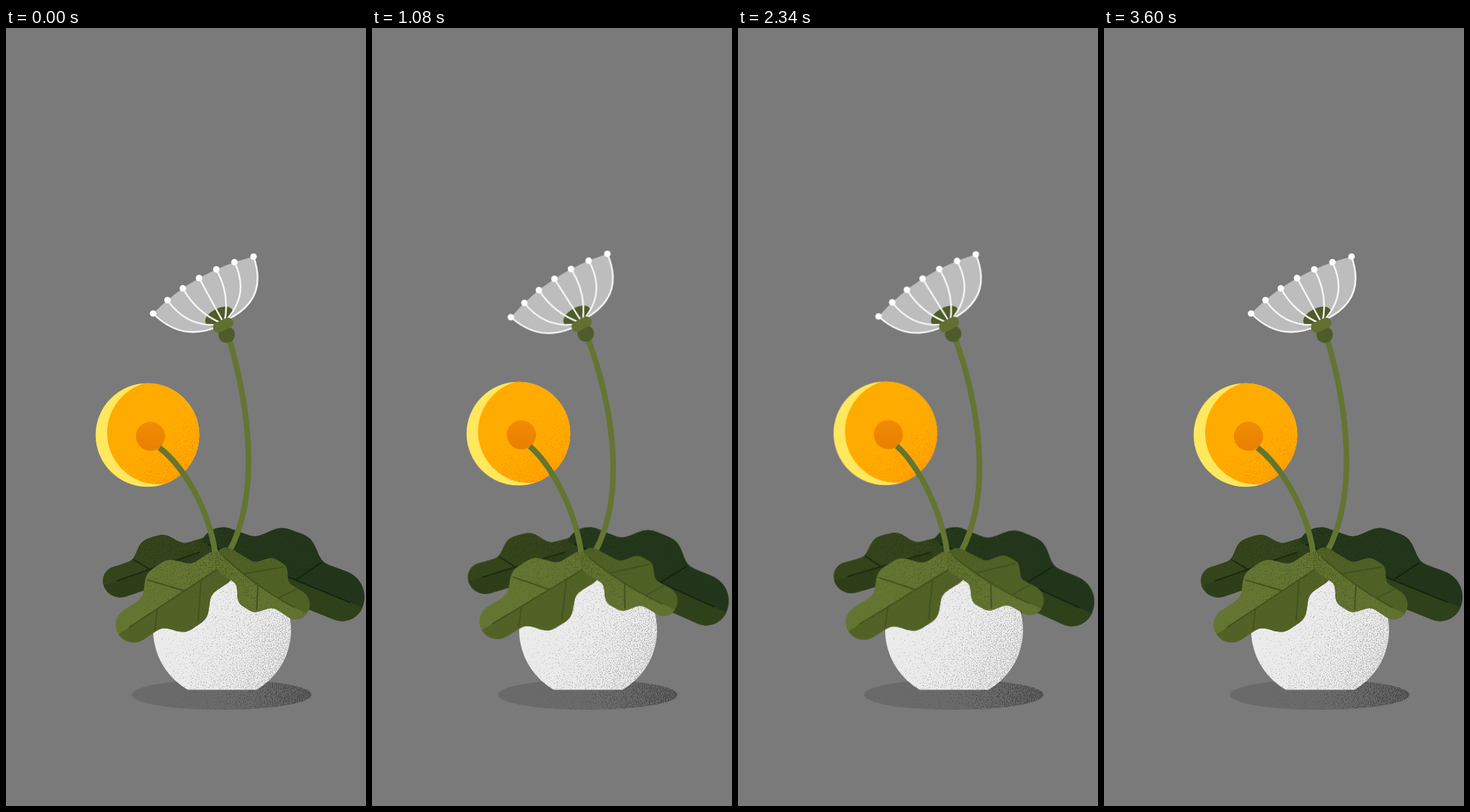
Recreate the animation shown at these times as an HTML page. Size 509 by 1101 pixels, loop 3.63 s.

```html
<!DOCTYPE html>
<html lang="en">
<head>
<meta charset="utf-8">
<title>Swaying plant</title>
<style>
  html, body { margin: 0; width: 100%; height: 100%; overflow: hidden; background: #7a7a7a; }
  svg { display: block; width: 100%; height: 100%; }

  .slow, .quick { animation: slow 3630ms cubic-bezier(.37, 0, .63, 1) infinite; }
  .quick { animation-name: quick; }
  @keyframes slow {
    0%, 99.17%, 100% { transform: translate(0, 0) rotate(0deg); }
    49.59% { transform: var(--to); }
  }
  @keyframes quick {
    0%, 99.17%, 100% { transform: translate(0, 0) rotate(0deg); }
    41.32% { transform: var(--to); }
  }

  #backLeft { transform-origin: 280px 745px; --to: translate(0, 0) rotate(3.6deg); }
  #backRight { transform-origin: 310px 740px; --to: translate(0, 0) rotate(3.2deg); }
  #frontLeft { transform-origin: 300px 760px; --to: translate(0, 0) rotate(2.8deg); }
  #frontRight { transform-origin: 322px 768px; --to: translate(0, 0) rotate(-5deg); }
  #puff { transform-origin: 312px 434px; --to: translate(-12px, -2px) rotate(-4.6deg); }
  #ball { --to: translate(10.5px, -3px) rotate(0deg); }

  .stem { fill: none; stroke: #647532; stroke-width: 8; }
  #tall { animation: tall 3630ms cubic-bezier(.37, 0, .63, 1) infinite; }
  #short { animation: short 3630ms cubic-bezier(.37, 0, .63, 1) infinite; }
  @keyframes tall {
    0%, 99.17%, 100% { d: path("M316 442 C342 530 361 658 315 742"); }
    41.32% { d: path("M303.4 440 C337.8 530 361 658 315 742"); }
  }
  @keyframes short {
    0%, 99.17%, 100% { d: path("M217 594 C248 618 286 676 296 744"); }
    49.59% { d: path("M226.5 591 C252 615 287 676 296 744"); }
  }
</style>
</head>
<body>
<svg viewBox="0 0 509 1101" preserveAspectRatio="none">
  <defs>
    <!-- Turns a soft alpha gradient into speckles of the same colour -->
    <filter id="grain" color-interpolation-filters="sRGB">
      <feTurbulence type="fractalNoise" baseFrequency=".6" numOctaves="2" seed="4"/>
      <feColorMatrix values="0 0 0 0 0  0 0 0 0 0  0 0 0 0 0  1 0 0 0 0" result="noise"/>
      <feComposite in="SourceGraphic" in2="noise" operator="arithmetic" k2="4" k3="8" k4="-6" result="dots"/>
      <feComponentTransfer in="SourceGraphic" result="flat"><feFuncA type="linear" slope="30"/></feComponentTransfer>
      <feComposite in="flat" in2="dots" operator="in"/>
    </filter>
    <clipPath id="ballClip"><circle cx="200" cy="576" r="73.3"/></clipPath>
    <linearGradient id="core" x2="0" y2="1">
      <stop stop-color="#f08c04"/><stop offset="1" stop-color="#ea7f00"/>
    </linearGradient>
    <g id="grads"></g>
  </defs>

  <ellipse cx="305" cy="943.5" rx="127" ry="21.5" fill="#6a6a6a"/>
  <ellipse cx="305" cy="943.5" rx="127" ry="21.5" fill="url(#shadowGrain)" filter="url(#grain)"/>

  <g id="backLeft" class="slow"></g>
  <g id="backRight" class="slow"></g>

  <path fill="#ebebeb" d="M257 936.5 A97.5 97.5 0 1 1 354 936.5 Z"/>
  <path fill="url(#potGrain)" filter="url(#grain)" d="M257 936.5 A97.5 97.5 0 1 1 354 936.5 Z"/>

  <path id="tall" class="stem" d="M316 442 C342 530 361 658 315 742"/>
  <g id="puff" class="quick"></g>

  <g id="ball" class="slow">
    <circle cx="200" cy="576" r="73.3" fill="#ffe75e"/>
    <g clip-path="url(#ballClip)">
      <circle cx="216" cy="573" r="73" fill="#ffab00"/>
      <circle cx="216" cy="573" r="73" fill="url(#ballGrain)" filter="url(#grain)"/>
    </g>
    <circle cx="204.3" cy="577.7" r="20.6" fill="url(#core)"/>
  </g>
  <path id="short" class="stem" d="M217 594 C248 618 286 676 296 744"/>

  <g id="frontLeft" class="quick"></g>
  <g id="frontRight" class="slow"></g>
</svg>
<script>
  const $ = id => document.getElementById(id);
  const mix = (a, b, t) => a + (b - a) * t;
  const line = pts => 'M' + pts.map(p => p.map(v => v.toFixed(1))).join('L');

  function grad(id, [x1, y1], [x2, y2], color, from, to) {
    return `<linearGradient id="${id}" gradientUnits="userSpaceOnUse" x1="${x1}" y1="${y1}" x2="${x2}" y2="${y2}">
      <stop stop-color="${color}" stop-opacity="${from}"/>
      <stop offset="1" stop-color="${color}" stop-opacity="${to}"/></linearGradient>`;
  }

  $('grads').innerHTML =
    grad('shadowGrain', [250, 940], [430, 946], '#4c4c4c', 0.05, 0.75) +
    grad('potGrain', [235, 810], [395, 905], '#bcbcbc', 0.08, 0.6) +
    grad('ballGrain', [205, 555], [262, 635], '#ff8f00', 0, 0.65);

  // A leaf is a midrib with a rounded band and one lobe on each side.
  // Side: width at base, width at tip, lobe position, lobe height, lobe spread.
  function leaf(id, { base, tip, up, low, bow = 0, ribs, colors: [top, bottom, speck, vein] }) {
    const dx = tip[0] - base[0], dy = tip[1] - base[1], len = Math.hypot(dx, dy);
    const sign = Math.sign(dx), nx = sign * dy / len, ny = -sign * dx / len;
    const at = (s, w) => [base[0] + dx * s / len + nx * w, base[1] + dy * s / len + ny * w];
    const cap = (d, r) => d < r ? Math.sqrt(1 - (1 - d / r) ** 2) : 1;
    const width = (s, [w0, w1, pos, height, spread]) =>
      (mix(w0, w1, s / len) + height * Math.exp(-(((s - pos) / spread) ** 4))) * cap(s, w0) * cap(len - s, w1);
    const mid = s => at(s, -bow * 4 * (s / len) * (1 - s / len));

    const steps = Array.from({ length: 61 }, (_, i) => len * (1 - Math.cos(Math.PI * i / 60)) / 2);
    const upper = steps.map(s => at(s, width(s, up)));
    const lower = steps.map(s => at(s, -width(s, low))).reverse();
    const edge = line([...upper, ...lower]) + 'Z';
    const midrib = steps.filter(s => s > 10 && s < len - 18).map(mid);
    const side = ([from, to, dir]) =>
      line([mid(from), at(to, dir * 0.9 * width(to, dir > 0 ? up : low))]);

    $(id).innerHTML = `
      ${grad(id + 'Grain', tip, base, speck, 0.02, 0.5)}
      <path d="${edge}" fill="${top}"/>
      <path d="${line([...steps.map(mid), ...lower])}Z" fill="${bottom}"/>
      <path d="${edge}" fill="url(#${id}Grain)" filter="url(#grain)"/>
      <path d="${line(midrib)}${ribs.map(side).join('')}" fill="none" stroke="${vein}"
        stroke-width="2" stroke-linecap="round"/>`;
  }

  leaf('backLeft', {
    base: [310, 729], tip: [138, 789], up: [17, 21, 94, 23, 30], low: [26, 25, 94, 0, 30],
    ribs: [[113, 130, 1]], colors: ['#36441b', '#2e3e19', '#22331a', '#1a2a12']
  });
  leaf('backRight', {
    base: [276, 727], tip: [504, 820], up: [32, 40, 119, 28, 40], low: [32, 31, 130, 15, 32],
    ribs: [[144, 168, 1]], colors: ['#22351a', '#2f411a', '#2b3e1b', '#14240f']
  });
  leaf('frontLeft', {
    base: [320, 752], tip: [159, 858], up: [26, 24, 94, 26, 33], low: [24, 26, 94, 26, 33],
    ribs: [[81, 116, 1], [53, 88, -1], [127, 146, -1]],
    colors: ['#647532', '#526226', '#4a5a24', '#42521d']
  });
  leaf('frontRight', {
    base: [300, 741], tip: [425, 829], up: [13, 24, 79, 20, 22], low: [24, 18, 78, 22, 24], bow: 6,
    ribs: [[73, 92, -1], [47, 88, 1], [107, 121, 1]],
    colors: ['#506126', '#627230', '#46561f', '#42521d']
  });

  // Seven filaments fan out from the collar to an arc of tips
  const quad = (a, b, c, t) => mix(mix(a, b, t), mix(b, c, t), t);
  const fan = Array.from({ length: 7 }, (_, i) => {
    const k = i / 6;
    const tip = [quad(208, 267, 350, k), quad(404, 344, 323.5, k)];
    const end = [mix(303, 312, k), mix(421, 413, k)];
    const dx = end[0] - tip[0], dy = end[1] - tip[1];
    const bow = 2 * (17 - 39 * k ** 1.2) / Math.hypot(dx, dy);
    const bend = [tip[0] + dx / 2 - dy * bow, tip[1] + dy / 2 + dx * bow];
    return { tip, bend, end };
  });
  const first = fan[0], last = fan[6];

  $('puff').innerHTML = `
    <path fill="#bdbdbd" d="M${first.end} Q${first.bend} ${first.tip} Q267 344 ${last.tip} Q${last.bend} ${last.end}Z"/>
    <ellipse cx="301" cy="408" rx="21" ry="11" fill="#4d5c28" transform="rotate(-27 301 408)"/>
    <path fill="none" stroke="#f6f6f6" stroke-width="2.4"
      d="${fan.map(f => `M${f.tip} Q${f.bend} ${f.end}`).join('')}"/>
    ${fan.map(f => `<circle cx="${f.tip[0]}" cy="${f.tip[1]}" r="4.6" fill="#fff"/>`).join('')}
    <circle cx="312" cy="434" r="11.6" fill="#4d5c28"/>
    <rect x="292" y="413" width="30" height="15" rx="7" fill="#617030" transform="rotate(-24 307 420.5)"/>`;
</script>
</body>
</html>
```
